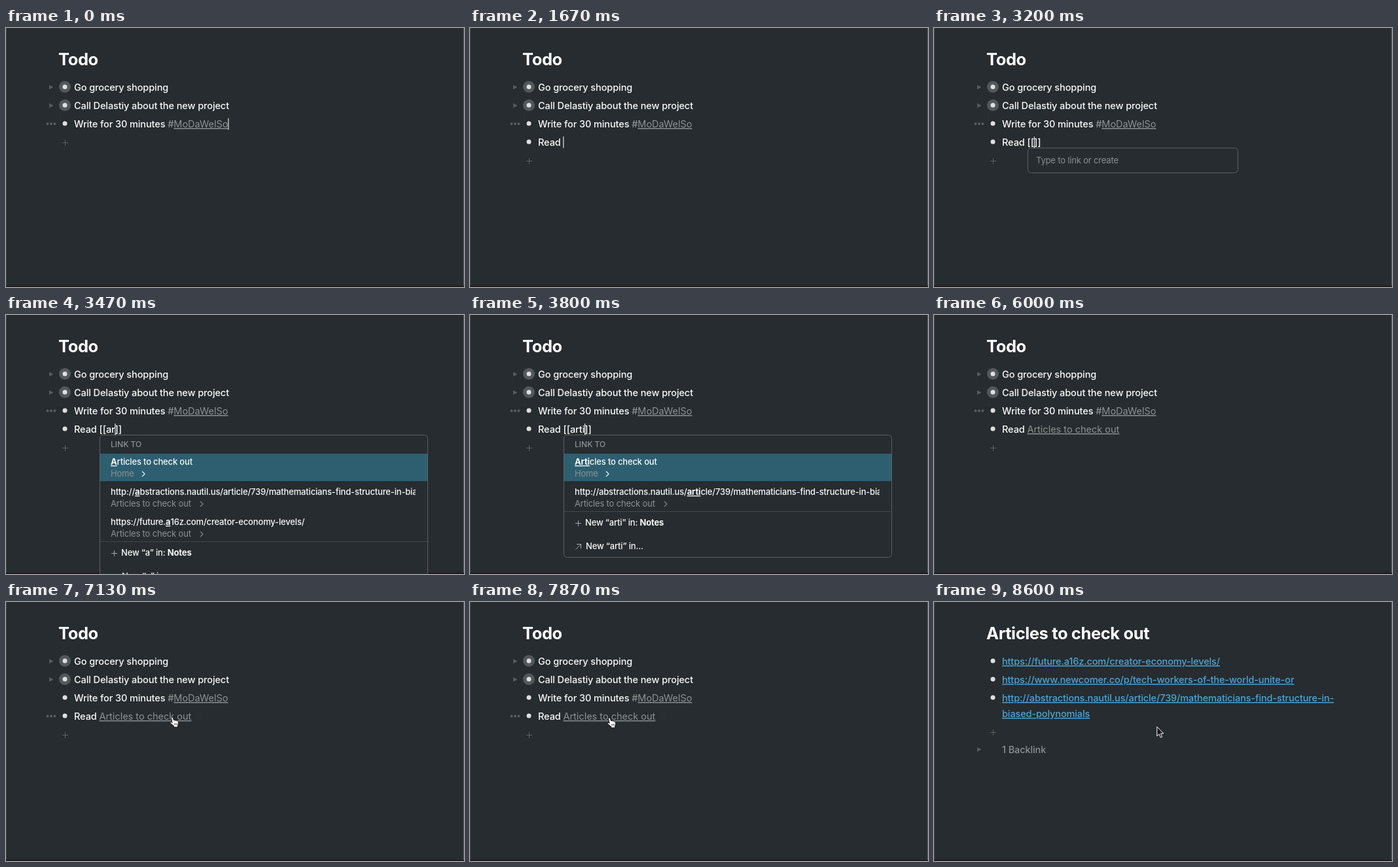
An HTML page that plays this animation: 700x396 px, repeating every 9.67 s.

```html
<!DOCTYPE html>
<html lang="en">
<head>
<meta charset="utf-8">
<title>Todo outline</title>
<style>
  html, body { margin: 0; width: 100%; height: 100%; overflow: hidden; background: #262c2f; }
  svg { display: block; width: 100vw; height: 100vh; }
  text {
    font: 500 14.5px Inter, Roboto, sans-serif; letter-spacing: -.1px; font-optical-sizing: none;
    fill: #fafafa; white-space: pre;
  }
  .title { font-size: 25.5px; font-weight: 700; letter-spacing: -.38px; fill: #fff; }
  .mute { fill: #8d9194; }
  .inner { font-weight: 400; letter-spacing: 0; fill: #8d9194; }
  .web { letter-spacing: -.12px; fill: #4ba6d8; }
  .inner, .web, .hit { text-decoration: underline; text-decoration-thickness: 1px; text-underline-offset: 2px; }
  .small { font-size: 13px; letter-spacing: -.17px; }
  .small.mute { font-weight: 400; }
  .head { font-size: 12px; letter-spacing: 0; fill: #8d9194; }
  .hit, .bold { font-weight: 700; }
  .line { fill: none; }
  .box { fill: #262c2f; stroke: #5c6063; }
</style>
</head>
<body>
<svg viewBox="0 0 700 396">
  <defs>
    <clipPath id="urlClip"><rect x="156" y="255" width="470" height="140"/></clipPath>
    <g id="beam">
      <path d="M1 .5Q4.5 .5 4.5 3Q4.5 .5 8 .5M4.5 3V13M1 15.5Q4.5 15.5 4.5 13Q4.5 15.5 8 15.5" fill="none" stroke="#e8e8e8" stroke-width="1.3"/>
    </g>
    <g id="arrow">
      <path d="M.8 .8V15L4.1 11.9L6.4 17.2L8.7 16.2L6.5 11H10.8Z" fill="#17191b" stroke="#fff" stroke-linejoin="round"/>
    </g>
    <g id="hand">
      <path d="M4.2 9.5L2.6 2.6Q2.5 .9 3.9 .9Q5 .9 5.4 2.2L6.5 5.8Q8.2 4.8 9 6.1Q10.6 5.4 11.3 6.8Q13.2 6.4 13.6 8.5Q14.2 11.3 12.7 13.5V16.2H6.6V14.6L1.2 10Q.5 8.4 2 8.2Q3 8.2 4.2 9.5Z" fill="#fff" stroke="#101214" stroke-linejoin="round"/>
      <path d="M7.6 10.3V13.2M9.5 10.2V13.2M11.3 10V13.2" stroke="#33373a" stroke-width=".8"/>
    </g>
  </defs>
  <g id="scene"></g>
</svg>
<script>
const LOOP = 9670, STEP = 1000 / 15;
const scene = document.getElementById('scene');

// time, typed text, popup query (null: closed, '': prompt), caret visible
const typing = [
  [200, '', null, 1], [730, '', null, 0], [800, 'R', null, 1], [1070, 'Re', null, 1],
  [1200, 'Rea', null, 1], [1470, 'Read', null, 1], [1670, 'Read ', null, 1],
  [2400, 'Read ', null, 0], [2470, 'Read [', null, 1], [2600, 'Read [[', null, 1],
  [2670, 'Read [[', '', 1], [2930, 'Read [[', '', 0], [3200, 'Read [[', '', 1],
  [3270, 'Read [[a', '', 1], [3330, 'Read [[a', 'a', 1], [3470, 'Read [[ar', 'a', 1],
  [3530, 'Read [[ar', 'ar', 1], [3600, 'Read [[art', 'ar', 1], [3670, 'Read [[art', 'art', 1],
  [3730, 'Read [[arti', 'art', 1], [3800, 'Read [[arti', 'arti', 1],
  [3870, 'Read [[artic', 'arti', 1], [3930, 'Read [[artic', 'artic', 1],
  [4000, 'Read [[articl', 'articl', 1], [4070, 'Read [[article', 'articl', 1],
  [4130, 'Read [[article', 'article', 1], [5130, 'Read [[article', 'article', 0]
];
const LINKED = 5530, OPENED = 8070;
const blinks = [[LINKED, 1], [6000, 0], [6530, 1], [7070, 0]];
// time, x, y of the pointer's top left corner
const path = [
  [6670, 360, 141], [6870, 328, 158], [7130, 251, 175], [7400, 215, 177], [7530, 211, 176],
  [7670, 210, 176], [7870, 209, 176], [8270, 209, 176], [8330, 214, 172], [8400, 238, 164],
  [8470, 280, 168], [8530, 322, 182], [8600, 340, 190]
];

const at = (table, t) => table.filter(row => row[0] <= t).pop();
const text = (x, y, str, cls = '') => `<text x="${x}" y="${y}" class="${cls}">${str}</text>`;
const span = (str, cls = '') => `<tspan class="${cls}">${str}</tspan>`;
const stroke = (d, color, width = 1) =>
  `<path d="${d}" class="line" stroke="${color}" stroke-width="${width}"/>`;
const plus = (x, y, color = '#5c6063') => stroke(`M${x - 4.5} ${y}h9M${x} ${y - 4.5}v9`, color);
const chevron = (x, y, color) => stroke(`M${x} ${y - 4}l4 4l-4 4`, color, 1.4);
const triangle = y => `<path d="M66 ${y - 3.5}l6.5 3.5l-6.5 3.5z" fill="#585c5f"/>`;
const dots = y => [63.5, 69, 74.5].map(x => `<circle cx="${x}" cy="${y}" r="1.9" fill="#5a5e61"/>`).join('');
const bullet = (y, parent) =>
  (parent ? `<circle cx="90" cy="${y}" r="9" fill="#54585b"/>` : '') +
  `<circle cx="90" cy="${y}" r="3.5" fill="#dedfe0"/>`;

function mark(str, query) {
  const i = str.toLowerCase().indexOf(query);
  return i < 0 ? str : str.slice(0, i) + span(str.slice(i, i + query.length), 'hit') + str.slice(i + query.length);
}

function popup(query) {
  if (query === '')
    return '<rect x="143.5" y="183.5" width="321" height="38" rx="5" class="box"/>' +
      text(156, 207, 'Type to link or create', 'small mute');
  const urls = ['http://abstractions.nautil.us/article/739/mathematicians-find-structure-in-biased-polynomials'];
  if (query === 'a')
    urls.push('https://future.a16z.com/creator-economy-levels/');
  const extra = (urls.length - 1) * 46;
  const hits = urls.map((url, i) => {
    const y = 275 + i * 46;
    return `<g clip-path="url(#urlClip)">${text(160, y, mark(url, query), 'small')}</g>` +
      text(160, y + 18, 'Articles to check out', 'small mute') + chevron(297, y + 14, '#7b7f82');
  }).join('');
  return `<rect x="143.5" y="183.5" width="501" height="${187 + extra}" rx="5" class="box"/>` +
    text(160, 202, 'LINK TO', 'head') +
    '<rect x="144" y="212" width="500" height="42" fill="#2d5f70"/>' +
    text(160, 229, mark('Articles to check out', query), 'small') +
    text(160, 247, 'Home', 'small mute') + chevron(208, 243, '#dfe6e9') + hits +
    `<g transform="translate(0 ${extra})">` +
    stroke('M144 300.5H644', '#43474a') + plus(165.5, 318.5, '#a5a8aa') +
    text(176, 322, `New “${query}” in: ${span('Notes', 'bold')}`, 'small') +
    stroke('M161.5 358.5l8-8M163 350.5h6.5v6.5', '#a5a8aa') +
    text(177, 358, `New “${query}” in...`, 'small') + '</g>';
}

function pointer(t) {
  if (t < path[0][0]) return null;
  let i = path.findIndex(p => p[0] > t);
  if (i < 0) i = path.length;
  const a = path[i - 1], b = path[i] || a;
  const k = b === a ? 0 : (t - a[0]) / (b[0] - a[0]);
  return { x: a[1] + (b[1] - a[1]) * k, y: a[2] + (b[2] - a[2]) * k };
}

function todoPage(t, mouse) {
  const state = at(typing, t), linked = t >= LINKED;
  const low = mouse && mouse.y > 160;
  let out = text(80, 57, 'Todo', 'title') +
    triangle(90.5) + bullet(90, true) + text(104, 96, 'Go grocery shopping') +
    triangle(118.5) + bullet(118, true) + text(104, 124, 'Call Delastiy about the new project') +
    stroke('M83.5 128v12', '#2d3135') + dots(low ? 174.5 : 146.5) + bullet(146) +
    `<text x="104" y="152"${state ? '' : ' id="typed"'}>Write for 30 minutes ${span('#', 'mute')}${span('MoDaWelSo', 'inner')}</text>` +
    plus(90.5, state ? 203.5 : 175.5);
  if (!state) return out;
  out += bullet(174);
  if (linked) {
    out += `<text id="typed" x="104" y="180">Read ${span('Articles to check out', 'inner')}</text>`;
    if (low && mouse.x < 284) out += stroke('M291 171h8v8h-8zM293 177l4-4', '#303438');
  } else {
    const str = state[1], open = str.split('[').length - 1;
    out += `<text id="typed" data-n="${str.length}" x="104" y="180">${str}${']'.repeat(open)}</text>`;
    if (state[2] !== null) out += popup(state[2]);
  }
  return out;
}

function articlesPage() {
  return text(80, 57, 'Articles to check out', 'title') + [90, 118, 146].map(y => bullet(y)).join('') +
    text(104, 96, 'https://future.a16z.com/creator-economy-levels/', 'web') +
    text(104, 124, 'https://www.newcomer.co/p/tech-workers-of-the-world-unite-or', 'web') +
    text(104, 152, 'http://abstractions.nautil.us/article/739/mathematicians-find-structure-in-', 'web') +
    text(104, 176, 'biased-polynomials', 'web') +
    plus(90.5, 199.5) + triangle(225.5) + text(104, 231, '1 Backlink', 'mute');
}

function addCaret(t) {
  const state = at(typing, t), linked = t >= LINKED;
  const shown = linked ? at(blinks, t)[1] : state ? state[3] : 1;
  if (!shown) return;
  const el = document.getElementById('typed');
  const n = 'n' in el.dataset ? +el.dataset.n : el.getNumberOfChars();
  const x = (n ? el.getEndPositionOfChar(n - 1).x : 104) + (linked ? 3.5 : .3);
  scene.insertAdjacentHTML('beforeend',
    `<rect x="${x - .5}" y="${state ? 166 : 138}" width="1.2" height="17.5" fill="#e4e5e6"/>`);
}

function render(t) {
  const mouse = pointer(t), opened = t >= OPENED;
  scene.innerHTML = '<rect width="700" height="396" fill="#262c2f"/>' +
    '<rect width="1" height="396" fill="#44484a"/><rect x="699" width="1" height="396" fill="#5a5d5f"/>' +
    '<rect y="394" width="700" height="2" fill="#20191e"/>' +
    (opened ? articlesPage() : todoPage(t, mouse));
  if (!opened) addCaret(t);
  if (mouse) {
    const overLink = mouse.y > 160 && mouse.x < (opened ? 236 : 282);
    const shape = overLink ? 'hand' : opened ? 'arrow' : 'beam';
    scene.insertAdjacentHTML('beforeend', `<use href="#${shape}" x="${mouse.x}" y="${mouse.y}"/>`);
  }
}

const start = performance.now();
let last = -1;
function tick() {
  const t = (performance.now() - start) % LOOP;
  const step = Math.floor((t + 5) / STEP);
  if (step !== last) {
    last = step;
    render(step * STEP + 5);
  }
  requestAnimationFrame(tick);
}
tick();
</script>
</body>
</html>
```
